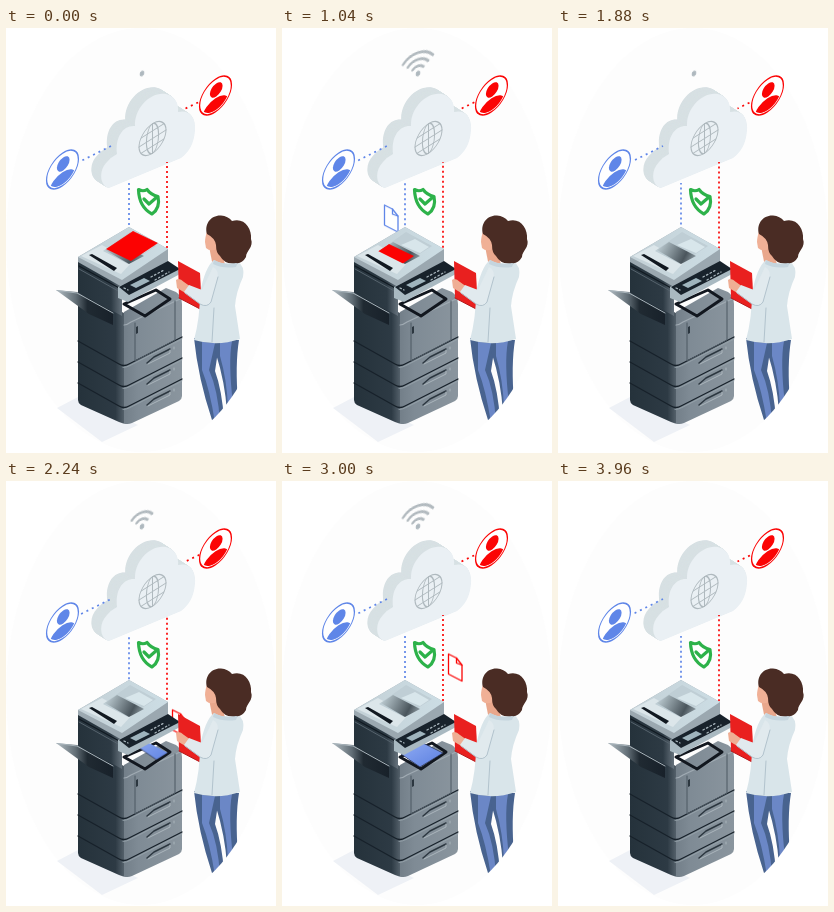
Animation of 270 by 425 pixels, one loop 4000 ms. Source, as an HTML page:

```html
<!DOCTYPE html>
<html lang="en">
<head>
<meta charset="utf-8">
<title>Cloud printing</title>
<style>
  html, body { margin: 0; width: 100%; height: 100%; overflow: hidden; background: #fff; }
  svg { display: block; width: 270px; height: 425px; }
  .line { fill: none; stroke-linecap: round; stroke-linejoin: round; }
  .dots { fill: none; stroke-width: 1.7; stroke-dasharray: 2 3; }
  .link { stroke-dasharray: 2 4; }
  .blue { color: #5f86e8; }
  .red { color: #fb0505; }
  .dots, .ring, .doc { stroke: currentColor; }
</style>
</head>
<body>
<svg viewBox="0 0 270 425">
  <defs>
    <linearGradient id="left" x1="0" x2="1"><stop stop-color="#25323b"/><stop offset=".75" stop-color="#2d3a44"/><stop offset="1" stop-color="#66727c"/></linearGradient>
    <linearGradient id="right" x1="0" x2="1"><stop stop-color="#737f89"/><stop offset=".25" stop-color="#7f8b95"/><stop offset="1" stop-color="#8a959e"/></linearGradient>
    <linearGradient id="lid" x1="0" x2="1"><stop stop-color="#c3d0d6"/><stop offset="1" stop-color="#ccdde4"/></linearGradient>
    <linearGradient id="flap" x1="0" x2="1"><stop stop-color="#b4bfc5"/><stop offset=".35" stop-color="#616d75"/><stop offset=".55" stop-color="#202a32"/><stop offset="1" stop-color="#18212a"/></linearGradient>
    <linearGradient id="shade" x1="0" x2="1" y1=".3" y2=".6"><stop stop-color="#bccbd1"/><stop offset=".75" stop-color="#4a555c"/><stop offset="1" stop-color="#87949b"/></linearGradient>
    <linearGradient id="screen" x1="0" x2="1" y2="1"><stop stop-color="#8fabf3"/><stop offset="1" stop-color="#5b7fe0"/></linearGradient>
    <clipPath id="oval"><ellipse cx="135" cy="212" rx="135" ry="212"/></clipPath>
    <clipPath id="badge"><circle r="15.8"/></clipPath>
    <clipPath id="feeder"><path d="M96 223L129 201L155 214L122 236Z"/></clipPath>
    <clipPath id="outlet"><path d="M118 273L141 261L162 272L138 287Z"/></clipPath>
    <path id="cloudShape" d="M103 160C94 158 92 143 101 134Q105 129 111 126C109 109 117 97 129 98C128 80 145 63 160 66C169 68 173 76 172 84C184 81 190 90 189 102C188 116 183 124 175 130Z"/>
    <g id="user">
      <circle class="ring" r="17.5" fill="#fff" stroke-width="1.4"/>
      <g fill="currentColor" clip-path="url(#badge)"><circle cx=".8" cy="-5.500" r="7"/><ellipse cy="13.500" rx="14" ry="10.500"/></g>
    </g>
    <g id="sheet" class="doc line" stroke-width="1.3">
      <path fill="#fff" d="M0 0L8 4L13.500 11V27L0 20Z"/><path d="M8 4V9L13.500 11"/>
    </g>
    <g id="drawer">
      <path class="line" stroke="#17212a" stroke-width="1.3" d="M72 313L113 336Q118 339 123 336L176 309"/>
      <path class="line" stroke="#9aa6ae" stroke-width=".8" d="M117 339.500Q120 339.500 124 337.500L176 311"/>
      <path class="line" stroke="#2c3740" stroke-width="1.5" d="M141 335L148 329L164 321"/>
      <path class="line" stroke="#b4bec5" stroke-width=".8" d="M142 336L164 325V322M168 319V321"/>
    </g>
  </defs>

  <ellipse cx="135" cy="212" rx="135" ry="212" fill="#fdfdfd"/>

  <g class="line" id="wifi" stroke="#b2babf" stroke-width="2.7" transform="matrix(.96 -.32 0 1 136 45.500)">
    <ellipse rx="2.3" ry="2.8" fill="#aeb8be" stroke="none"/>
    <path d="M-5.700 -5.200A7.700 7.700 0 0 1 5.700 -5.200"/>
    <path d="M-10.500 -9.500A14.200 14.200 0 0 1 10.500 -9.500"/>
    <path d="M-15.500 -13.800A20.700 20.700 0 0 1 15.500 -13.800"/>
  </g>

  <g class="blue" id="blueDoc"><use href="#sheet" x="102.500" y="177"/></g>
  <g class="red" id="redDoc"><use href="#sheet" x="166.500" y="202.500"/></g>

  <g id="cloud" fill="#d7e0e3"></g>
  <use href="#cloudShape" fill="#eaf0f4"/>
  <g class="line" stroke="#afb9be" stroke-width="1.2" transform="matrix(.87 -.55 0 .95 146.500 110.500)">
    <circle r="15.500"/><ellipse rx="7" ry="15.500"/>
    <path d="M0 -15.500V15.500M-15.500 0H15.500M-13 -8H13M-13 8H13"/>
  </g>

  <path class="dots link blue" d="M105 118L75 133"/>
  <path class="dots link red" d="M179.500 80.500L195 73"/>
  <path class="dots blue" d="M123 155V203"/>
  <path class="dots red" d="M161 240V134"/>
  <use class="blue" href="#user" transform="matrix(.91 -.6 0 .93 56.500 141.500)"/>
  <use class="red" href="#user" transform="matrix(.91 -.6 0 .93 209.500 67.500)"/>

  <g class="line" stroke="#2db24a">
    <path stroke-width="3.2" fill="#fff" d="M132.500 161.500Q137 164 141 161.500Q145 167 152 168.500Q154.500 180 146 186Q133 179 132.500 161.500Z"/>
    <path stroke-width="3.2" d="M138 171L143 176L151 169"/>
  </g>

  <path fill="#eef1f6" d="M51 380L72 369L132 397L96 414Z"/>
  <g id="printer">
    <path fill="url(#left)" d="M72 262L122 287V396Q117 396 113 394L75 377Q72 375 72 372Z"/>
    <path fill="url(#right)" d="M118 284L160 260L170 264Q176 268 176 276V368Q176 371 173 373L126 395Q121 397 118 395Z"/>
    <path class="line" stroke="#a0abb3" stroke-width="1.2" d="M118 297Q121 297 125 294L174 271"/>
    <use href="#drawer"/><use href="#drawer" y="21"/><use href="#drawer" y="42"/>
    <path class="line" stroke="#4d5963" d="M129 295V333L169 312V273"/>
    <path fill="#2c3740" d="M130 299L132 298V305L130 306Z"/>

    <path class="line" fill="#12171f" stroke="#12171f" stroke-width="3" d="M118 276L150 262L164 271L139 288Z"/>
    <g clip-path="url(#outlet)"><path id="output" fill="url(#screen)" stroke="#2c3658" stroke-width=".8" d="M119 273L141 262L161 272L138 286Z"/></g>

    <path fill="url(#left)" d="M72 230L116 252V288L72 264Z"/>
    <path class="line" stroke="#8b979f" stroke-width="2" d="M73 232L115 255"/>
    <path class="line" stroke="#111a22" stroke-width="1.3" d="M73 238L115 261"/>
    <path class="line" stroke="#56636d" d="M73 241L114 264"/>
    <path fill="#9ba8b0" d="M72 229L123 199L162 221V234L116 259L72 234Z"/>
    <path fill="url(#lid)" d="M72 229L123 199L162 221L116 252Z"/>
    <path fill="#dce6ea" d="M75 228L96 217L126 234L115 246Z"/>
    <path fill="#111820" d="M83 227L86 226L111 240L108 243Z"/>
    <path fill="#bfced5" d="M97 223L124 204L150 218L122 236Z"/>
    <path fill="url(#shade)" d="M99 222L111 214L138 228L123 236Z"/>
    <path fill="#d8e6eb" d="M119 217L133 211L147 219L138 225Z"/>
    <g clip-path="url(#feeder)"><path id="page" fill="#fc0202" d="M97 223L124 205L149 217L122 235Z"/></g>

    <path fill="#a9b9c1" d="M112 259L162 235L174 241V246L122 274L112 270Z"/>
    <path fill="#18222b" d="M113 259L162 233L174 241L123 267Z"/>
    <path fill="#9fb4bd" d="M124 257L138 250L144 253L130 260Z"/>
    <path class="line" stroke="#a9b6bd" stroke-width="1.300" stroke-dasharray="1.500 2.500" d="M145 249L158 242M149 252L163 244M118 260L122 262"/>

    <path fill="url(#flap)" d="M50 262L71 264L107 284V297L83 286Z"/>
    <path class="line" stroke="#a8b4bb" d="M51 262.500L71 265L107 285"/>
  </g>

  <g clip-path="url(#oval)">
    <path fill="#48638f" d="M188 310H214L209 343Q216 362 218 392H206Q192 350 188 310Z"/>
    <path fill="#6b87c6" d="M196 314L209 315L203 342Q212 362 214 394L209 395Q204 362 196 342Z"/>
    <path fill="#48638f" d="M209 312H233Q229 336 232 375L221 384Q219 354 210 326Z"/>
    <path fill="#6b87c6" d="M214 314L226 313Q222 334 227 376L222 380Q221 352 214 328Z"/>
    <path fill="#e9201f" d="M172 233L194 245L196 282L173 270Z"/>
    <path class="line" stroke="#b4171a" d="M173 270L196 282"/>
    <path fill="#e9a78c" d="M203 218H215L219 237L207 239Z"/>
    <path fill="#d9e5ea" d="M208 232Q220 239 232 234Q239 238 237 249Q230 264 229 278L234 311Q211 319 188 312Q194 290 194 265Q199 239 208 232Z"/>
    <path fill="#c5d5de" d="M208 232Q219 238 232 234L230 239Q217 241 207 236Z"/>
    <path fill="#f0b096" d="M201 203Q199 210 199 214L200 220Q204 224 211 221L215 204Z"/>
    <path fill="#4a2c24" d="M201 206C198 196 205 187 215 187.500Q222 188 226 193C238 189 246 200 245 211C248 219 240 223 240 229Q236 236 230 235Q219 237 214 228Q210 225 210 217Q209 210 201 206Z"/>
    <path fill="#efae94" d="M170 252Q173 249 178 254L185 259L181 266L171 260Z"/>
    <path fill="#e1eaee" d="M183 257L196 262L207 239Q214 242 211 253L205 274Q201 280 194 276L178 264Z"/>
    <path class="line" stroke="#b2c3cd" d="M212 249L205 274Q201 280 194 276L179 265M208 280L206 314"/>
  </g>
</svg>
<script>
  const LOOP = 4000;
  const $ = selector => document.querySelector(selector);

  // Each step is [time in ms, styles].
  function play(element, steps, duration = LOOP) {
    element.animate(
      steps.map(([time, styles]) => ({ offset: time / duration, ...styles })),
      { duration, iterations: Infinity }
    );
  }

  const at = (x, y) => ({ transform: `translate(${x}px, ${y}px)` });
  const show = { opacity: 1 }, hide = { opacity: 0 };

  // Stacked outlines give the cloud its thickness.
  for (let i = 20; i > 0; i--) {
    const layer = document.createElementNS("http://www.w3.org/2000/svg", "use");
    layer.setAttribute("href", "#cloudShape");
    layer.setAttribute("transform", `translate(${-i * .49} ${-i * .32})`);
    $("#cloud").append(layer);
  }

  const wifiTimes = [[0, 1940], [100, 1860], [200, 1800], [300, 1740]];
  [...$("#wifi").children].forEach((part, i) => {
    const [on, off] = wifiTimes[i];
    play(part, [[0, hide], [on, hide], [on, show], [off, show], [off, hide], [2000, hide]], 2000);
  });

  document.querySelectorAll(".dots").forEach(line => {
    const period = line.matches(".link") ? 6 : 5;
    play(line, [[0, { strokeDashoffset: 0 }], [1000, { strokeDashoffset: -period }]], 1000);
  });

  play($("#page"), [
    [0, { ...at(3, -2), ...show }], [480, at(-3, 2)], [1040, at(-17, 11)],
    [1400, { ...at(-30, 20), ...show }], [1400, hide], [4000, { ...at(-30, 20), ...hide }]
  ]);

  const SPEED = .0735;
  const slide = (from, to, origin, direction) => {
    const y = time => direction * SPEED * (time - origin);
    return [
      [0, { ...at(0, y(from)), ...hide }], [from, { ...at(0, y(from)), ...hide }],
      [from, { ...at(0, y(from)), ...show }], [to, { ...at(0, y(to)), ...show }],
      [to, { ...at(0, y(to)), ...hide }], [LOOP, { ...at(0, y(to)), ...hide }]
    ];
  };
  play($("#blueDoc"), slide(200, 1640, 1040, 1));
  play($("#redDoc"), slide(2060, 3920, 2600, -1));

  play($("#output"), [
    [0, { ...at(24, -14), ...hide }], [2000, { ...at(24, -14), ...hide }],
    [2000, { ...at(24, -14), ...show }], [2500, { ...at(0, 0), ...show }],
    [3500, { ...at(0, 0), ...show }], [3700, { ...at(0, 0), ...hide }],
    [LOOP, { ...at(0, 0), ...hide }]
  ]);
</script>
</body>
</html>
```
